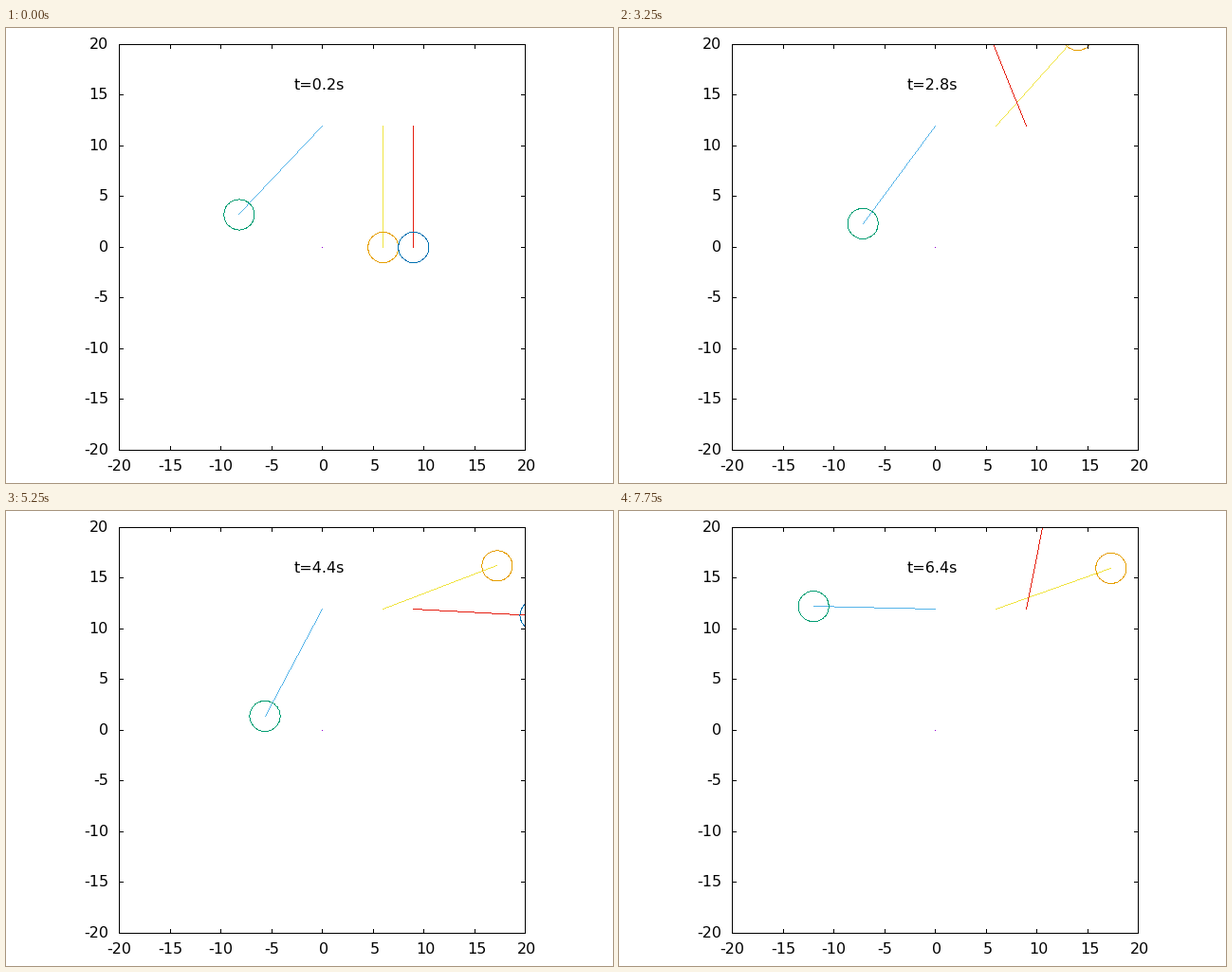
Animation, 640 px wide and 480 px high, one loop 8 s. Source, as a matplotlib script:

```python
import numpy as np
import matplotlib
import matplotlib.pyplot as plt
from matplotlib.animation import FuncAnimation
from matplotlib.colors import to_rgba

W, H, DPI = 640, 480, 100
UNIT = 10.7                      # pixels per plot unit
LENGTH, RADIUS = 12, 1.5
FRAMES, STEP = 32, 0.2
AMPLITUDE, OMEGA = 45, 1.488     # first free swing
IMPACT = 1.2

# Key poses after the impact: time, then the three angles in degrees
POSES = np.array([
    (1.2, 9.6, 0, 0),
    (2.0, -212.4, -134, 57.2),
    (2.8, -396.5, -222, 202),
    (3.4, -244.3, -276.9, 315.4),
    (4.4, -28.1, -249.4, 446.9),
    (4.9, 45, -298, 521),
    (5.4, -29.9, -390.4, 606.3),
    (6.4, -91.1, -250.6, 889),
])

# pivot, rod colour, ball colour
PENDULUMS = [
    (0, "#56b4e9", "#009e73"),
    (6, "#f0e442", "#e69f00"),
    (9, "#e51e10", "#0072b2"),
]

matplotlib.rcParams["font.family"] = "DejaVu Sans"


def to_px(x, y):
    """Plot units to whole pixels, counted from the top left."""
    col = np.floor(333.5 + UNIT * np.asarray(x))
    row = H - 1 - np.floor(248.5 + UNIT * np.asarray(y))
    return col.astype(int), row.astype(int)


LEFT, TOP = to_px(-20, 20)
RIGHT, BOTTOM = to_px(20, -20)


def monotone(ts, vs, t):
    """Monotone cubic interpolation: slopes vanish at turning points."""
    h = np.diff(ts)
    d = np.diff(vs) / h
    m = np.concatenate([d[:1], np.zeros(len(d) - 1), d[-1:]])
    for k in range(1, len(d)):
        if d[k - 1] * d[k] > 0:
            m[k] = 2 * d[k - 1] * d[k] / (d[k - 1] + d[k])
    k = int(np.clip(np.searchsorted(ts, t) - 1, 0, len(h) - 1))
    s = (t - ts[k]) / h[k]
    return (vs[k] * (1 + 2 * s) * (1 - s) ** 2 + vs[k + 1] * s * s * (3 - 2 * s)
            + h[k] * s * (1 - s) * (m[k] * (1 - s) - m[k + 1] * s))


def angles(t):
    if t <= IMPACT:
        return [-AMPLITUDE * np.cos(OMEGA * t), 0, 0]
    return [monotone(POSES[:, 0], POSES[:, k], t) for k in (1, 2, 3)]


def paint(img, cols, rows, color):
    """Colour single pixels, clipped to the plot box."""
    ok = (cols >= LEFT) & (cols <= RIGHT) & (rows >= TOP) & (rows <= BOTTOM)
    img[rows[ok], cols[ok]] = to_rgba(color)


def line(img, x0, y0, x1, y1, color="black"):
    n = max(abs(x1 - x0), abs(y1 - y0)) + 1
    cols = np.floor(np.linspace(x0, x1, n) + 0.5).astype(int)
    rows = np.floor(np.linspace(y0, y1, n) + 0.5).astype(int)
    paint(img, cols, rows, color)


def circle(img, x, y, color):
    a = np.radians(np.arange(0, 360, 3))
    paint(img, *to_px(x + RADIUS * np.cos(a), y + RADIUS * np.sin(a)), color)


def draw_frame(img):
    for x in (LEFT, RIGHT):
        line(img, x, TOP, x, BOTTOM)
    for y in (TOP, BOTTOM):
        line(img, LEFT, y, RIGHT, y)
    for v in range(-15, 20, 5):
        x, y = to_px(v, v)
        for edge, inward in ((TOP, 4), (BOTTOM, -4)):
            line(img, x, edge, x, edge + inward)
        for edge, inward in ((LEFT, 4), (RIGHT, -4)):
            line(img, edge, y, edge + inward, y)


def draw_scene(t):
    img = np.zeros((H, W, 4))
    paint(img, *to_px([0], [0]), "#9400d3")
    for (pivot, rod, ball), angle in zip(PENDULUMS, angles(t)):
        a = np.radians(angle)
        x, y = pivot + LENGTH * np.sin(a), LENGTH * (1 - np.cos(a))
        line(img, *to_px(pivot, LENGTH), *to_px(x, y), rod)
        circle(img, x, y, ball)
    draw_frame(img)
    return img


fig = plt.figure(figsize=(W / DPI, H / DPI), dpi=DPI, facecolor="white")
ax = fig.add_axes([0, 0, 1, 1])
ax.axis("off")
scene = ax.imshow(draw_scene(STEP), extent=(0, W, H, 0), aspect="auto",
                  interpolation="nearest", zorder=2)


def write(x, y, text, ha):
    return ax.text(x, y, text, size=16 * 72 / DPI, ha=ha, va="baseline", zorder=1)


for v in range(-20, 21, 5):
    x, y = to_px(v, v)
    write(x + (2 if v >= 0 else 0.5), 467, str(v), "center")
    write(108, y + 5, str(v), "right")
label = write(330.5, 65, "", "center")


def update(i):
    t = round(STEP * (i + 1), 1)
    label.set_text(f"t={t:g}s")
    scene.set_data(draw_scene(t))
    return []


anim = FuncAnimation(fig, update, frames=FRAMES, interval=250, repeat=True,
                     repeat_delay=0)
plt.show()
```
